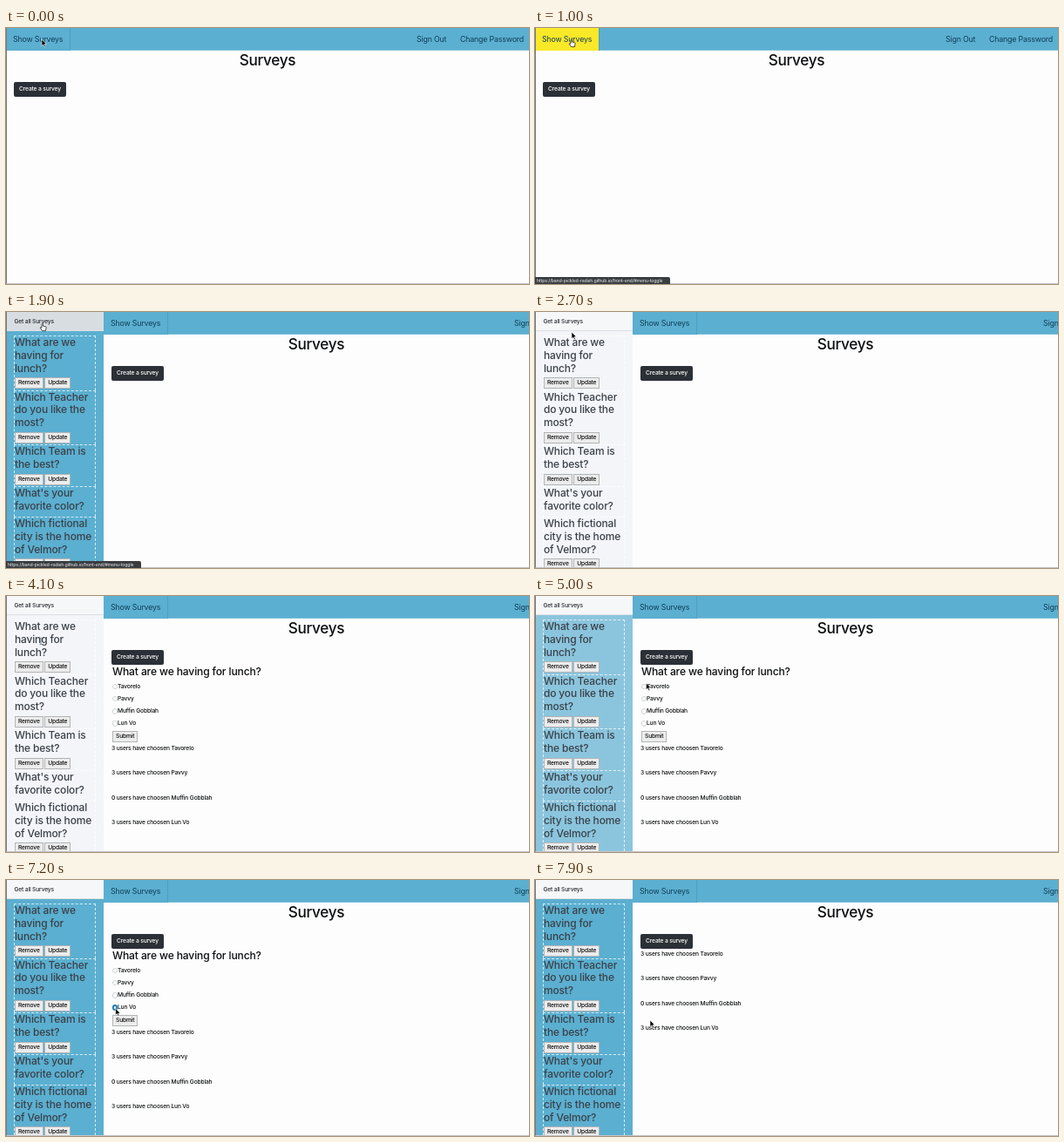
Recreate the animation shown at these times as an HTML page. Size 600 by 294 pixels, loop 8 s.

```html
<!DOCTYPE html>
<html lang="en">
<head>
<meta charset="utf-8">
<title>Surveys</title>
<style>
  html, body { margin: 0; width: 100%; height: 100%; overflow: hidden; }
  body { position: relative; background: #fdfdfd; color: #0c0e10;
    font: 450 6.7px/10px Inter, "Open Sans", sans-serif; letter-spacing: -.025em; }
  div, span, svg { box-sizing: border-box; }
  #page { position: absolute; inset: 0; }
  #side { position: absolute; left: 0; top: 0; height: 300px; overflow: hidden; }
  #head { height: 22px; padding: 5.5px 0 0 9.5px; white-space: nowrap; color: #272b30;
    border-bottom: 1px solid #dcdfe3; }
  #list { margin: 5px 9px 0; }
  .item { border: 1px dashed rgba(255, 255, 255, .75); border-bottom-width: 0;
    padding-bottom: 1.2px; color: #3b4148; }
  .item h5 { margin: 0 0 3px; font: 550 12px/14.75px Inter, "Open Sans", sans-serif; }
  .btn { display: inline-block; box-sizing: border-box; height: 13px; border: 1px solid #b2b4b6;
    background: #ececec; color: #0c0c0c; line-height: 11px; padding: 0 3px; vertical-align: top; }
  .item .btn { margin: 0 1.5px .3px 0; }
  #main { position: absolute; top: 0; bottom: 0; right: 0; overflow: hidden; }
  #nav { position: absolute; left: 0; top: 0; width: 600px; height: 26px; background: #5bafd0;
    border-bottom: 1px solid #83c1da; color: #113f56; font-size: 8.8px; font-weight: 400;
    line-height: 26px; white-space: nowrap; }
  #nav span { position: absolute; top: 0; }
  #show { left: 0; width: 74px; height: 26px; padding-left: 8px; border-right: 1px solid #529fbf; }
  h1 { position: absolute; left: 0; right: 0; top: 26px; margin: 0; text-align: center;
    font: 550 17.2px/22px Inter, "Open Sans", sans-serif; letter-spacing: -.02em; }
  #create { position: absolute; left: 9px; top: 62px; width: 60px; height: 17px; border-radius: 2px;
    background: #2b3036; color: #fff; text-align: center; line-height: 17px; white-space: nowrap; }
  h2 { position: absolute; left: 10px; top: 79px; margin: 0; white-space: nowrap;
    font: 550 12.1px/16px Inter, "Open Sans", sans-serif; letter-spacing: -.012em; }
  .row { position: absolute; left: 9px; white-space: nowrap; }
  .opt { padding-left: 7px; }
  .opt i { position: absolute; left: .5px; top: 2px; width: 6.5px; height: 6.5px; box-sizing: border-box;
    border: .7px solid #d0d2d4; border-radius: 50%; background: #fff; }
  .opt.on i { border: 2px solid #1f7fb8; }
  #submit { position: absolute; left: 10px; top: 155px; }
  #status { position: absolute; left: 0; top: 286px; width: 155px; height: 8px; background: #3a3d40;
    color: #d2d4d6; font-size: 5.2px; line-height: 8px; padding-left: 2px; white-space: nowrap;
    border-radius: 0 2px 0 0; overflow: hidden; }
  #frame { position: absolute; inset: 0; border: solid #77797b; border-width: 0 0 1px 1px;
    border-bottom-color: #c4c6c8; }
  #cursor { position: absolute; left: 0; top: 0; width: 12px; height: 12px; overflow: visible; }
</style>
</head>
<body>
<div id="page">
  <div id="side"><div id="head">Get all Surveys</div><div id="list"></div></div>
  <div id="main">
    <div id="nav"><span id="show">Show Surveys</span><span style="left:471px">Sign Out</span><span style="left:521px">Change Password</span></div>
    <h1>Surveys</h1>
    <div id="create">Create a survey</div>
    <div id="form"><h2>What are we having for lunch?</h2><span class="btn" id="submit">Submit</span></div>
    <div id="results"></div>
  </div>
</div>
<div id="frame"></div>
<div id="status">https://band-pickled-radish.github.io/front-end/#menu-toggle</div>
<svg id="cursor" stroke-linejoin="round">
  <path id="arrow" d="M0 0V7.6L1.8 6 3 8.7 4.3 8.1 3.1 5.5H5.4Z" fill="#000" stroke="#fff" stroke-width=".6"/>
  <path id="hand" d="M0 .6Q.7-.4 1.4.6V3L4.6 3.8Q5.3 4 5.1 5L4.5 8.6H.6L-1.9 5.2Q-1.6 4 0 5.2Z" fill="#fff" stroke="#222" stroke-width=".8"/>
  <path id="beam" d="M-1.5 0Q0 0 0 1Q0 0 1.5 0M0 1V7M-1.5 8Q0 8 0 7Q0 8 1.5 8" fill="none" stroke="#5d7484" stroke-width=".8"/>
</svg>
<script>
const $ = id => document.getElementById(id);
const LOOP = 8000, STEP = 100, SIDE = 112;
const BLUE = [91, 175, 208], LIGHT = [243, 245, 249], YELLOW = [250, 233, 40];

const questions = [
  ['What are we having for lunch?', true],
  ['Which Teacher do you like the most?', true],
  ['Which Team is the best?', true],
  ["What's your favorite color?", false],
  ['Which fictional city is the home of Velmor?', true]
];
const choices = [['Tavorelo', 3], ['Pavvy', 3], ['Muffin Gobblah', 0], ['Lun Vo', 3]];

$('list').innerHTML = questions.map(([text, own]) => `<div class="item"><h5>${text}</h5>` +
  (own ? '<span class="btn">Remove</span><span class="btn">Update</span>' : '') + '</div>').join('');
choices.forEach(([name, votes], i) => {
  $('form').insertAdjacentHTML('beforeend',
    `<div class="row opt" style="top:${98.5 + i * 14.3}px"><i></i>${name}</div>`);
  $('results').insertAdjacentHTML('beforeend',
    `<div class="row" style="top:${169.5 + i * 28.6}px">${votes} users have choosen ${name}</div>`);
});
const picked = document.querySelectorAll('.opt')[3];

// time, x, y of the pointer tip
const path = [
  [0, 41, 13], [1900, 41, 13], [2300, 42, 23], [2700, 42, 23], [3600, 40, 48],
  [4500, 40, 48], [5300, 168, 124], [5600, 168, 124], [5900, 164, 128],
  [6500, 125, 146], [7100, 125, 146], [7600, 132, 161], [8000, 132, 161]
];

const clamp = v => Math.max(0, Math.min(1, v));
const bez = (a, b, s) => 3 * a * s * (1 - s) ** 2 + 3 * b * s * s * (1 - s) + s ** 3;
// CSS "ease"
function ease(x) {
  let lo = 0, hi = 1;
  for (let i = 0; i < 20; i++) {
    const mid = (lo + hi) / 2;
    if (bez(.25, .25, mid) < x) lo = mid; else hi = mid;
  }
  return bez(.1, 1, lo);
}
const ramp = (t, from, ms = 500) => t <= from ? 0 : t >= from + ms ? 1 : ease((t - from) / ms);
const mix = (a, b, k) => `rgb(${a.map((v, i) => Math.round(v + (b[i] - v) * k))})`;
const show = (id, on) => { $(id).style.visibility = on ? 'visible' : 'hidden'; };

function pointer(t) {
  const i = path.findIndex(p => p[0] > t);
  const [t0, x0, y0] = path[i - 1], [t1, x1, y1] = path[i];
  const u = clamp((t - t0) / (t1 - t0)), k = u * u * (3 - 2 * u);
  return [x0 + (x1 - x0) * k, y0 + (y1 - y0) * k];
}

function render(t) {
  const w = SIDE * ramp(t, 1200);
  $('side').style.width = $('main').style.left = w + 'px';
  $('side').style.background = mix(BLUE, LIGHT, ramp(t, 2200) - ramp(t, 4800));
  $('head').style.background = t < 2200 ? '#d8dde2' : '#f6f7f9';
  $('show').style.background = mix(BLUE, YELLOW, ramp(t, 150) - ramp(t, 1300, 400));
  $('page').style.transform = t >= 5700 && t < 6500 ? 'translateY(-1px)' : 'none';

  const form = t >= 4100 && t < 7700;
  show('form', form);
  show('results', t >= 4100);
  $('results').style.transform = form ? 'none' : 'translateY(-90.5px)';
  picked.classList.toggle('on', t >= 6700);
  show('status', t >= 300 && t < 2300);

  const hand = t >= 200 && t < 2200, beam = t >= 3400 && t < 4700;
  show('hand', hand);
  show('beam', beam);
  show('arrow', !hand && !beam);
  const [x, y] = pointer(t);
  $('cursor').style.transform = `translate(${x}px, ${y}px)`;
}

const start = performance.now();
function tick() {
  const t = (performance.now() - start) % LOOP;
  render(Math.floor(t / STEP) * STEP);
  requestAnimationFrame(tick);
}
tick();
</script>
</body>
</html>
```
